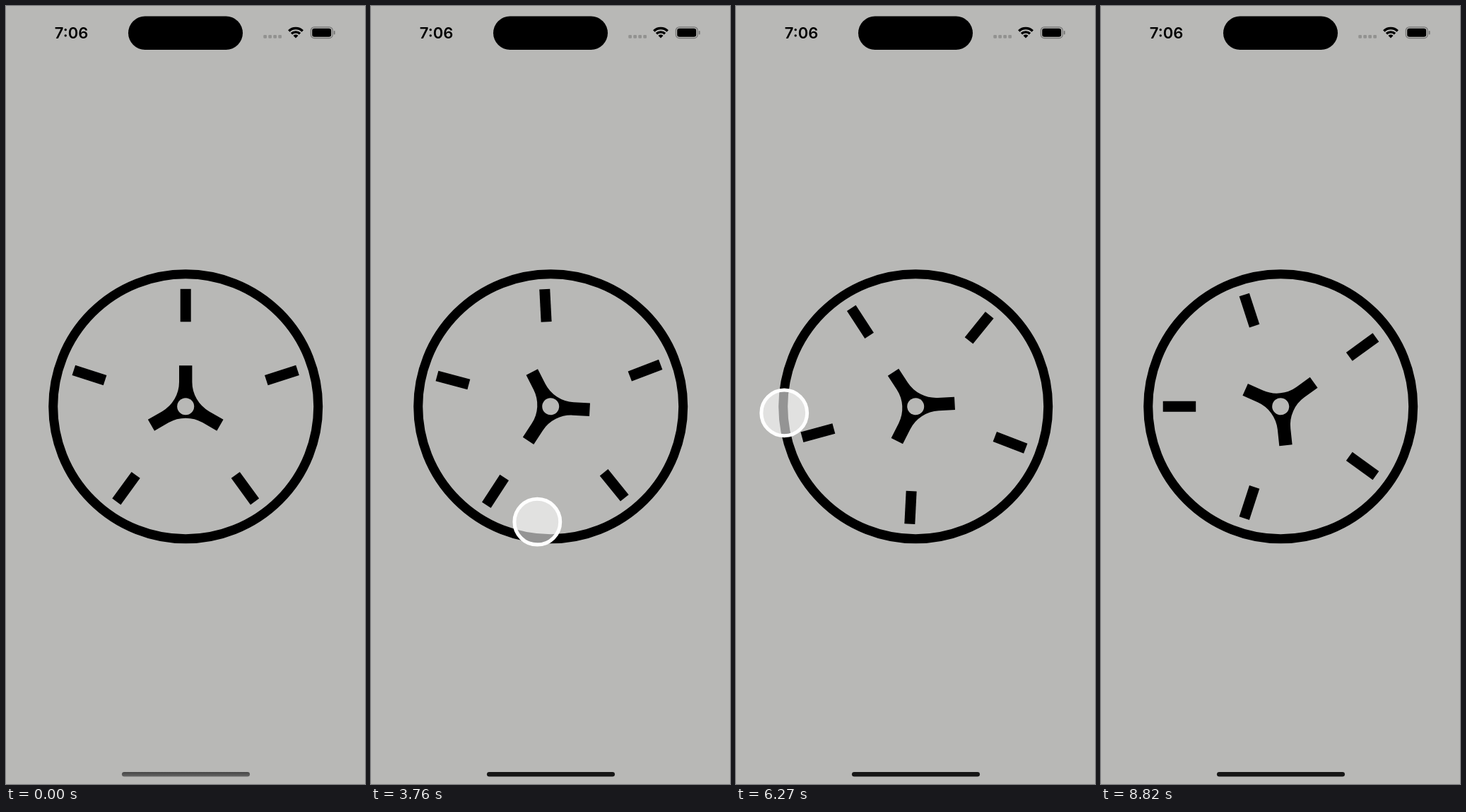
An HTML page with a canvas that plays this animation: 508x1102 px, repeating every 8.96 s.

```html
<!DOCTYPE html>
<html lang="en">
<head>
<meta charset="utf-8">
<style>
  html, body { margin: 0; width: 100%; height: 100%; overflow: hidden; background: #b8b8b6; }
  canvas { display: block; }
</style>
</head>
<body>
<canvas id="stage" width="508" height="1102"></canvas>
<script>
const ctx = document.getElementById('stage').getContext('2d');
const LOOP = 8960, CX = 254.2, CY = 567.3, BG = '#b8b8b6';
const rad = deg => deg * Math.PI / 180;

// Each drag: finger angle minus dial angle, release time,
// dial keys [ms, degrees] and finger distance keys [ms, pixels].
const drags = [
  { grip: 187.7, release: 2560,
    turn: [[1280, 0], [1350, 0], [1700, -30], [2440, -121.6], [2560, -138], [2770, -150]],
    reach: [[1280, 163.3], [2440, 148.6], [2560, 147]] },
  { grip: -26.5, release: 4510,
    turn: [[3610, -150], [3680, -150], [4000, -120], [4490, -53], [4620, -34], [4840, -16], [5140, -8]],
    reach: [[3610, 165], [4490, 158.7]] },
  { grip: -59.7, release: 7950,
    turn: [[5870, -8], [5940, -8], [6270, -33], [6600, -105], [7100, -230], [7550, -356.4],
           [7690, -404], [7950, -505], [8150, -575], [8400, -640], [8680, -664.5], [8820, -666]],
    reach: [[5870, 178], [6270, 186.2], [6600, 160], [7100, 150], [7400, 175], [7550, 193],
            [7670, 172], [7950, 155]] }
];

// Smooth curve through keys, without overshoot at turning points.
function sample(keys, t) {
  const last = keys.length - 1;
  if (t <= keys[0][0]) return keys[0][1];
  if (t >= keys[last][0]) return keys[last][1];
  const i = keys.findIndex(k => k[0] > t) - 1;
  const rate = j => (keys[j + 1][1] - keys[j][1]) / (keys[j + 1][0] - keys[j][0]);
  const slope = j => {
    if (j === 0 || j === last) return 0;
    const a = rate(j - 1), b = rate(j);
    return a * b <= 0 ? 0 : 2 * a * b / (a + b);
  };
  const span = keys[i + 1][0] - keys[i][0], u = (t - keys[i][0]) / span, v = 1 - u;
  return v * v * (1 + 2 * u) * keys[i][1] + u * u * (1 + 2 * v) * keys[i + 1][1]
    + span * u * v * (v * slope(i) - u * slope(i + 1));
}

function pill(x, y, w, h, r, fill) {
  ctx.beginPath();
  ctx.roundRect(x, y, w, h, r);
  ctx.fillStyle = fill;
  ctx.fill();
}

function disc(x, y, r, fill) {
  ctx.beginPath();
  ctx.arc(x, y, r, 0, 7);
  ctx.fillStyle = fill;
  ctx.fill();
}

function band(x, y, r, width, from, to, color) {
  ctx.beginPath();
  ctx.arc(x, y, r, from, to);
  ctx.lineWidth = width;
  ctx.strokeStyle = color;
  ctx.stroke();
}

function drawStatusBar() {
  pill(173, 14.5, 162, 47.5, 23.75, '#000');
  ctx.font = '600 22px Inter, sans-serif';
  ctx.textAlign = 'center';
  ctx.fillText('7:06', 92.5, 46);
  for (let i = 0; i < 4; i++) pill(364.3 + i * 7, 41, 4.7, 4.7, 1.2, '#929290');
  for (const [r, width] of [[14, 3.5], [8.7, 3.4], [2.5, 5]])
    band(410, 45.6, r, width, rad(-134), rad(-46), '#000');
  ctx.beginPath();
  ctx.roundRect(431.3, 29.8, 31, 15.8, 5);
  ctx.lineWidth = 1.2;
  ctx.strokeStyle = '#747473';
  ctx.stroke();
  pill(433.2, 31.8, 27, 11.9, 3.3, '#000');
  pill(463.8, 35, 1.8, 5.4, 0.9, '#747473');
}

function drawHomeBar(t) {
  const fade = Math.min(1, Math.max(0, (t - 2450) / 300));
  const tone = from => `rgb(${Array(3).fill(Math.round(from + (22 - from) * fade))})`;
  const shade = ctx.createLinearGradient(0, 1085, 0, 1092);
  shade.addColorStop(0, tone(70));
  shade.addColorStop(1, tone(104));
  pill(164, 1085, 181, 6.6, 3.3, shade);
}

// Three arms joined by rounded inner corners, set slightly above the pivot.
function drawHand() {
  const at = (k, x, y) => {
    const c = Math.cos(rad(120 * k)), s = Math.sin(rad(120 * k));
    return [x * c - y * s, x * s + y * c - 1.7];
  };
  ctx.beginPath();
  for (let k = 0; k < 3; k++) {
    ctx.lineTo(...at(k, -9.2, -56.3));
    ctx.lineTo(...at(k, 9.2, -56.3));
    ctx.arcTo(...at(k, 9.2, -9.2 / Math.sqrt(3)), ...at(k + 1, -9.2, -56.3), 48);
  }
  ctx.closePath();
  ctx.fillStyle = '#000';
  ctx.fill();
  disc(0, 0, 12, BG);
}

function drawDial(angle) {
  ctx.save();
  ctx.translate(CX, CY);
  band(0, 0, 187.5, 13, 0, 7, '#000');
  ctx.rotate(rad(angle));
  drawHand();
  ctx.fillStyle = '#000';
  for (let i = 0; i < 5; i++) {
    ctx.fillRect(-7.5, -166.5, 15, 46.5);
    ctx.rotate(rad(72));
  }
  ctx.restore();
}

function drawTouch(angle, reach) {
  const x = CX + reach * Math.sin(rad(angle)), y = CY - reach * Math.cos(rad(angle));
  disc(x, y, 33, 'rgba(255,255,255,.58)');
  band(x, y, 32.4, 5, 0, 7, '#fff');
}

function draw(t) {
  ctx.fillStyle = BG;
  ctx.fillRect(0, 0, 508, 1102);
  drawStatusBar();
  drawHomeBar(t);
  const drag = drags.filter(d => t >= d.turn[0][0]).pop();
  const angle = drag ? sample(drag.turn, t) : 0;
  drawDial(angle);
  if (drag && t < drag.release) drawTouch(angle + drag.grip, sample(drag.reach, t));
}

const start = performance.now();
function tick() {
  draw((performance.now() - start) % LOOP);
  requestAnimationFrame(tick);
}
tick();
</script>
</body>
</html>
```
